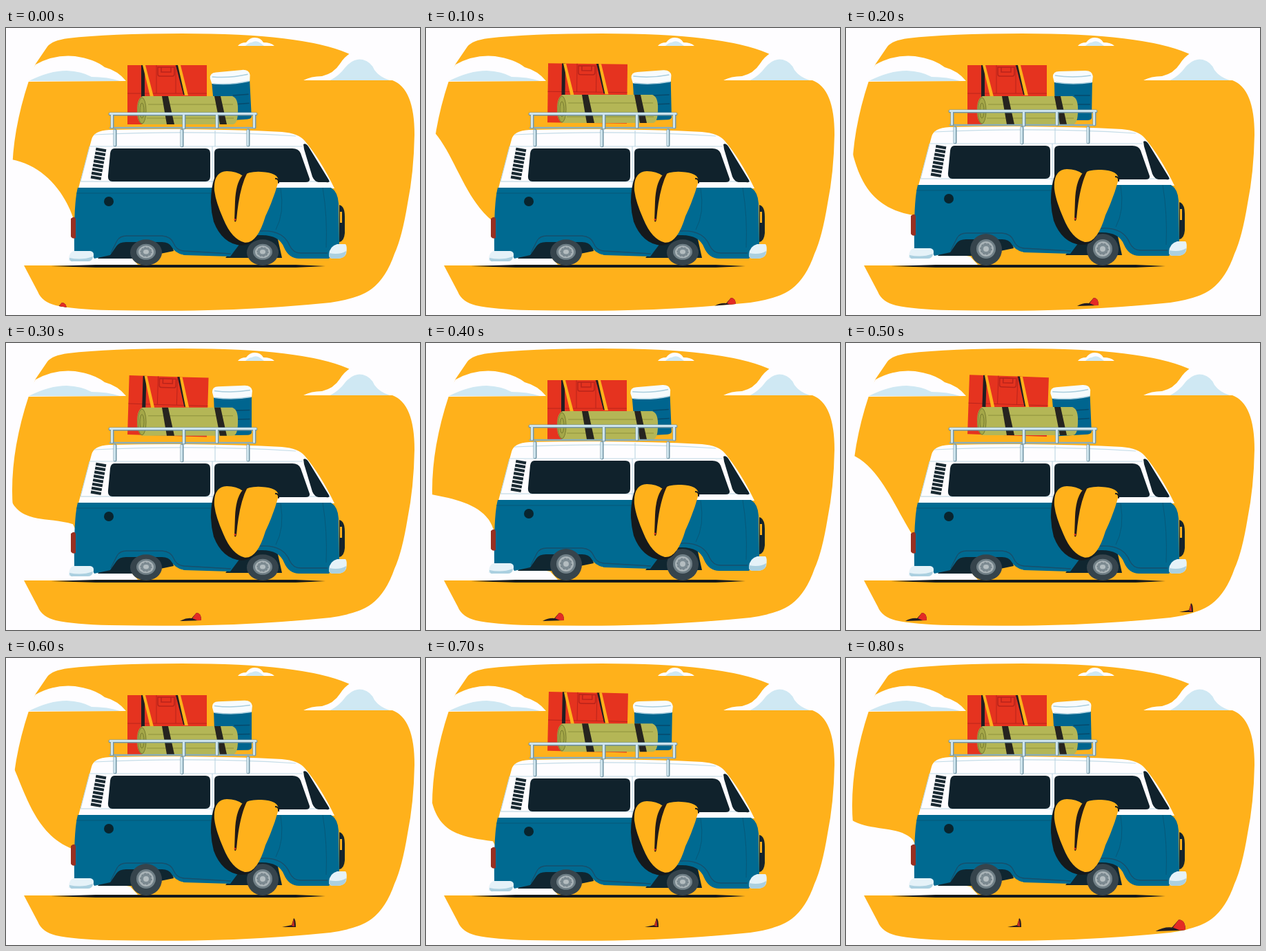
Animation of 600 by 417 pixels, one loop 900 ms. Source, as an HTML page:

```html
<!DOCTYPE html>
<html lang="en">
<head>
<meta charset="utf-8">
<title>Camper van</title>
<style>
  html, body { margin: 0; width: 100%; height: 100%; overflow: hidden; background: #fefdff; }
  svg { display: block; width: 100vw; height: 100vh; }
</style>
</head>
<body>
<svg viewBox="0 0 600 417" fill="none">
  <defs>
    <path id="land" d="M43 52L60 27Q67 18 90 15Q150 8 255 8Q430 8 496 37L560 76Q592 88 592 155Q591 210 582 255Q574 304 563 328Q551 363 530 379Q512 393 470 399Q400 406 330 409Q250 412 150 410Q100 409 72 403Q52 398 46 383L26 345L10 240Q4 165 33 77Z"/>
    <clipPath id="landClip"><use href="#land"/></clipPath>
    <g id="boulder">
      <path d="M-31 0Q-22-5-14-4L-7-12Q0-12 0-1Z" fill="#211c22"/>
      <path d="M-13-4L-7-12Q0-12 0-1L-6-1Z" fill="#e32b25"/>
    </g>
    <g id="pebble">
      <path d="M-20 0L-6-3L-3-13Q0-12 0 0Z" fill="#291c20"/>
      <path d="M-6-2L-3-12L-2-1Z" fill="#c92e24"/>
    </g>
    <g id="wheel">
      <circle cy="-23" r="23" fill="#36444c"/>
      <circle cy="-24" r="14" fill="#718087"/>
      <circle cy="-24" r="11" fill="#a9b3b7"/>
      <circle cy="-24" r="8" fill="#7d8b92" stroke="#5d6b72" stroke-dasharray="2 3"/>
      <circle cy="-24" r="4" fill="#b4bdc0"/>
    </g>
  </defs>

  <use href="#land" fill="#ffb11b"/>

  <g id="clouds" fill="#fefdff">
    <path d="M28 78L43 53Q70 38 100 41Q128 45 143 57Q162 62 174 77Z"/>
    <path d="M33 77Q63 62 88 62Q110 63 124 71Q148 71 165 77Z" fill="#cfe8f3"/>
    <path d="M431 76Q442 70 458 70Q475 66 484 52Q490 42 500 36L565 76Z"/>
    <path d="M470 76Q484 68 491 58Q503 43 517 46Q529 49 534 61Q541 71 556 76Z" fill="#cfe8f3"/>
    <path d="M336 26Q340 21 348 21Q354 13 361 14Q369 14 373 21Q384 21 389 26Z"/>
    <path d="M347 26Q352 21 356 21Q363 17 369 22L374 26Z" fill="#cfe8f3"/>
  </g>

  <path id="dust" fill="#fefdff"/>
  <g id="rocks" clip-path="url(#landClip)"></g>
  <path d="M65 346L130 344H420L463 346L420 348H130Z" fill="#15191c"/>

  <g id="suitcase">
    <path d="M176 54H291V140H176Z" fill="#e5331f"/>
    <path d="M176 95H291M218 54V95M246 54V95" stroke="#b9241b"/>
    <path d="M220 57h24v10q0 3-3 3h-18q-3 0-3-3zM225 57h14v7h-14z" stroke="#b9241b" stroke-width="1.5"/>
    <path d="M196 54h5v46h-5zM246 54h4l12 43h-5z" fill="#211e22"/>
    <path d="M198 54h4l12 46h-5zM249 54h4l11 44h-5z" fill="#ffb11b"/>
  </g>
  <g id="jug">
    <path d="M302 77H357L356 131Q355 134 350 134H308Q303 134 303 129Z" fill="#00658f"/>
    <path d="M300 71Q300 63 309 63L347 62Q357 62 358 70L357 79Q329 83 302 79Z" fill="#f7fbfd"/>
    <path d="M303 69Q329 73 355 69M304 79Q330 83 356 79" stroke="#a9cddd" stroke-width="1.5"/>
    <path d="M331 98h23M331 111h23" stroke="#064a6c" stroke-width="1.5"/>
  </g>
  <g id="roll">
    <path d="M198 99H328Q337 102 336 121Q336 139 329 140H198Q190 137 190 120Q190 102 198 99Z" fill="#b4b656"/>
    <path d="M206 111H329M204 131H330" stroke="#8e923d"/>
    <ellipse cx="197" cy="120" rx="6" ry="19" fill="#a4a748" stroke="#777b30"/>
    <ellipse cx="197" cy="120" rx="3" ry="11" stroke="#777b30"/>
    <path d="M226 99h9l9 41h-11zM302 99h9l9 41h-10z" fill="#26241f"/>
  </g>

  <g id="body">
    <path d="M133 331L155 302H238L243 320L190 331ZM318 330L348 294H392L400 330Z" fill="#102630"/>
    <path d="M106 225L124 158Q127 145 150 144Q280 141 400 147Q424 149 433 160Q455 186 476 229H105Z" fill="#fefdff"/>
    <path d="M128 151Q280 144 420 153M122 168H430" stroke="#c4dce7" stroke-width="1.2"/>
    <path d="M303 145V168M299 168V228M121 168L108 219H470" stroke="#b6d2df"/>
    <path d="M104 228H471Q481 234 482 251L483 310L468 331H425Q410 331 403 315Q396 297 371 297H353Q342 300 337 312L325 328L258 326Q245 323 240 314Q236 307 226 307H174Q164 307 160 313L151 326L128 331L122 320H99Q98 250 104 228Z" fill="#006a91"/>
    <path d="M152 323L161 305Q165 298 175 298H226Q239 299 243 309Q247 319 258 320L326 324M345 298Q350 290 371 291Q402 290 411 312Q416 323 427 323H466" stroke="#164f6c" stroke-width="1.3"/>
    <path d="M102 236H299M398 229Q404 265 391 289M459 228Q466 270 464 315" stroke="#075879"/>
    <path d="M157 171H289Q296 171 296 178V212Q296 219 289 219H154Q147 219 148 210L151 178Q152 171 157 171Z" fill="#10222c"/>
    <path d="M309 171H415Q424 171 427 178L440 215Q441 220 434 220H309Q302 220 302 212V177Q302 171 309 171Z" fill="#10222c"/>
    <path d="M431 165Q435 162 440 171L468 217Q470 221 464 220H453Q447 219 444 212L432 172Z" fill="#10222c"/>
    <path d="M138 171L130 216" stroke="#1a2a32" stroke-width="15" stroke-dasharray="4.2 1.7"/>
    <circle cx="149" cy="248" r="7" fill="#08252f"/>
    <path d="M94 273Q100 268 101 274V301Q96 303 94 299Z" fill="#973022"/>
    <path d="M483 253Q491 255 491 270V294Q490 306 483 307Z" fill="#16242c"/>
    <path d="M484 263h3v16h-3z" fill="#ffb11b"/>
    <path d="M91 334Q91 321 99 320H122Q128 321 127 327Q126 335 119 335H97Z" fill="#e5f2f8"/>
    <path d="M92 330Q110 334 126 328Q125 335 119 335H97Q92 336 92 330Z" fill="#abd0e0"/>
    <path d="M468 325Q469 313 480 310H492Q495 313 493 324Q490 331 480 331H473Q467 330 468 325Z" fill="#e5f2f8"/>
    <path d="M468 323Q484 326 493 320Q493 331 480 331H473Q467 330 468 323Z" fill="#abd0e0"/>
  </g>

  <g id="rack" stroke-linecap="round">
    <path d="M151 141H361" stroke="#86adbd" stroke-width="2.5"/>
    <path d="M151 121H362M154 122V140M158 145V166M258 122V141M255 145V167M306 122V140M360 122V140M351 145V166" stroke="#7295a5" stroke-width="5"/>
    <path d="M151 120.5H362M153.5 122V140M157.5 145V166M257.5 122V141M254.5 145V167M305.5 122V140M359.5 122V140M350.5 145V166" stroke="#cee4ed" stroke-width="3"/>
  </g>

  <use class="wheel" href="#wheel" x="203" y="345"/>
  <use class="wheel" href="#wheel" x="372" y="345"/>

  <g id="tongue">
    <path d="M303 212Q292 245 301 280Q313 312 340 315Q355 316 363 302L395 218Z" fill="#15191c"/>
    <path d="M302 234Q300 206 320 205Q334 205 343 212Q352 205 370 206Q395 207 395 220Q388 246 376 272Q364 313 346 311Q327 306 315 276Q304 251 302 234Z" fill="#ffb11b"/>
    <path d="M350 207L342 212Q333 224 332 250L331 279Q333 282 334 277Q338 230 350 207Z" fill="#201a19"/>
    <circle cx="332" cy="277" r="1.5" fill="#d83b20"/>
    <path d="M390 216Q396 216 395 223" stroke="#15191c" stroke-width="2"/>
  </g>
</svg>

<script>
const LOOP = 900, STEP = 100;
const ROCK_SPEED = 0.83; // px per ms
const part = id => document.getElementById(id);
const move = (id, transform) => part(id).setAttribute("transform", transform);

// Rocks pass in a row; x is where each one would be at the start of the loop.
const rocks = [
  { shape: "boulder", x: 88, y: 411, size: 1 },
  { shape: "boulder", x: 532, y: 404, size: 1 },
  { shape: "pebble", x: 918, y: 391, size: 1 },
  { shape: "boulder", x: 1156, y: 397, size: 1.4 }
];

// Puffs roll off the back twice per loop.
function dustPath(turn) {
  const wave = (mean, swing, peak) => mean + swing * Math.cos(turn - peak * Math.PI / 180);
  const edge = wave(191, 45, 270);
  const curve = [
    wave(35, 17, 10), wave(220, 42, 240),
    wave(63, 23, 330), wave(248, 14, 170),
    97, wave(272, 9, 70)
  ];
  return `M0 ${edge - 4}L8 ${edge}C${curve}L125 322L180 332L192 345H0Z`;
}

function draw(time) {
  const turn = 4 * Math.PI * time / LOOP;
  const hop = Math.max(0, Math.sin(2 * turn));
  // The van snaps between a high and a low pose, four times per loop.
  const low = time % (LOOP / 4) < LOOP / 8 ? 1 : 0;

  part("dust").setAttribute("d", dustPath(turn));
  move("body", `translate(0 ${4 * low})`);
  move("rack", `translate(0 ${4 * low})`);
  move("tongue", `translate(0 ${7 * low}) scale(1 ${1 - 0.02 * low})`);
  document.querySelectorAll(".wheel").forEach(wheel => wheel.setAttribute("transform",
    `translate(0 345) scale(1 ${1 - 0.18 * low}) translate(0 -345)`));

  move("suitcase", `translate(0 ${-6 * hop}) rotate(${2 * hop} 233 140)`);
  move("roll", `translate(0 ${-6 * hop})`);
  move("jug", `rotate(${-2 - 2 * Math.cos(turn)} 329 132)`);

  part("rocks").innerHTML = rocks.map(({ shape, x, y, size }) =>
    `<use href="#${shape}" transform="translate(${x - ROCK_SPEED * time} ${y}) scale(${size})"/>`).join("");
}

let shown = -1;
function tick() {
  const time = Math.floor(performance.now() % LOOP / STEP) * STEP;
  if (time !== shown) draw(shown = time);
  requestAnimationFrame(tick);
}
tick();
</script>
</body>
</html>
```
